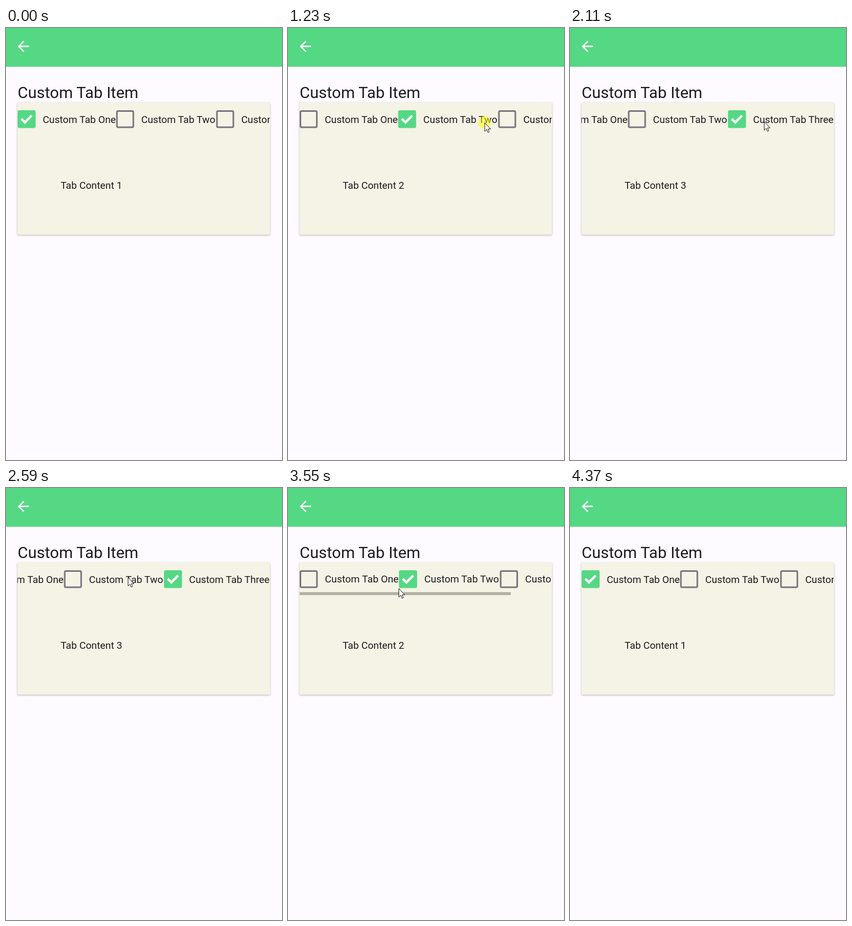
Animation of 522x814 px, one loop 4700 ms. Source, as an HTML page:

```html
<!DOCTYPE html>
<html lang="en">
<head>
<meta charset="utf-8">
<title>Custom Tab Item</title>
<style>
  html, body { margin: 0; width: 100%; height: 100%; overflow: hidden; background: #fdfbff; }
  svg { display: block; width: 522px; height: 814px; }
  text { font: 400 18.75px Roboto, sans-serif; fill: #1c1b1f; }
  .title { font-size: 30px; }
  .card { fill: #f5f3e5; filter: drop-shadow(0 1px 1.5px rgba(0, 0, 0, .3)); }
  .frame { fill: none; stroke: #79747e; stroke-width: 3; }
  .fill { fill: #55d884; }
  .tick { fill: none; stroke: #fff; stroke-width: 4.4; }
</style>
</head>
<body>
<svg viewBox="0 0 522 814">
  <defs>
    <clipPath id="view"><rect x="21.5" y="141" width="477.5" height="248"/></clipPath>
    <g id="off"><rect class="frame" x="1.5" y="1.5" width="31" height="30.5" rx="2"/></g>
    <g id="on">
      <rect class="fill" width="34" height="33.5" rx="3"/>
      <path class="tick" d="M7 16.2 13.8 22.8 26.6 10"/>
    </g>
  </defs>
  <rect width="522" height="814" fill="#fdfbff"/>
  <rect class="fill" width="522" height="73"/>
  <path transform="translate(16.8 18.7) scale(1.333)" fill="#fff"
    d="M20 11H7.83l5.59-5.59L12 4l-8 8 8 8 1.41-1.41L7.83 13H20z"/>
  <text class="title" x="22" y="132">Custom Tab Item</text>
  <rect class="card" x="21.5" y="140.5" width="478" height="249" rx="2"/>
  <g clip-path="url(#view)">
    <g id="strip"></g>
    <rect id="bar" y="196.3" width="396" height="5.4" fill="#b3aea3"/>
  </g>
  <text id="content" x="103.2" y="303"></text>
  <g id="pointer">
    <circle id="press" r="12" fill="#ff0" fill-opacity=".5"/>
    <path d="M.5 .5V16.6L4.2 13.2 6.6 18.8 9 17.8 6.7 12.3H11.5Z" fill="#fff" stroke="#111"/>
  </g>
</svg>
<script>
const LOOP = 4700, STEP = 68.3, LEFT = 22, VIEW = 477.5, TOTAL = 576.2;
const ENTER = 65, LEAVE = 4365, SETTLE = 3360;
const swipes = [1240, 3150];
const clicks = [{ time: 760, tab: 2 }, { time: 2050, tab: 3 }, { time: 2730, tab: 2 }, { time: 3960, tab: 1 }];

// Pointer stops: time, x, y
const stops = [
  [70, 448, 722], [550, 268, 180], [790, 270, 176], [1090, 396, 176], [1230, 371.5, 178],
  [1420, 302, 180], [1708, 387.5, 182], [2050, 386, 177], [2595, 230.5, 168],
  [3000, 124, 178], [3142, 143, 179], [3390, 238, 192], [3550, 209.5, 189],
  [3990, 118, 178], [4371, 505, 800]
];

const $ = id => document.getElementById(id);
const ramp = (t, from, length) => Math.min(1, Math.max(0, (t - from) / length));
const easeOut = p => 1 - (1 - p) ** 2;
const mix = (a, b, p) => a + (b - a) * p;

function pointerAt(t) {
  const i = Math.max(1, stops.findIndex(s => s[0] > t));
  const [t0, x0, y0] = stops[i - 1], [t1, x1, y1] = stops[i];
  const p = ramp(t, t0, t1 - t0);
  return [mix(x0, x1, p), mix(y0, y1, p)];
}

let left = 0;
$("strip").innerHTML = [["One", 186.3], ["Two", 189.2], ["Three", 200.7]].map(([name, width]) => {
  const tab = `<g transform="translate(${left} 155)"><use href="#off"/><text x="47.4" y="23.5">Custom Tab ${name}</text></g>`;
  left += width;
  return tab;
}).join("");
const boxes = [...document.querySelectorAll("#strip use")];

function draw(t) {
  const [out, back] = swipes.map(s => easeOut(ramp(t, s, 240)));
  const offset = (out - back) * (TOTAL - VIEW);
  const stretch = 1 + .0087 * Math.sin(Math.PI * ramp(t, SETTLE, 340));
  const place = x => `translate(${LEFT + x} 0) scale(${stretch} 1)`;
  $("strip").setAttribute("transform", place(-offset));
  $("bar").setAttribute("transform", place(offset * VIEW / TOTAL));

  const swipe = swipes.filter(s => t >= s).pop();
  $("bar").setAttribute("opacity", swipe ? 1 - ramp(t, swipe + 560, 240) : 0);

  const tab = clicks.filter(c => t >= c.time).pop()?.tab ?? 1;
  boxes.forEach((box, i) => box.setAttribute("href", i + 1 === tab ? "#on" : "#off"));
  $("content").textContent = `Tab Content ${tab}`;

  $("pointer").setAttribute("transform", `translate(${pointerAt(t)})`);
  $("pointer").setAttribute("visibility", t >= ENTER && t < LEAVE ? "visible" : "hidden");
  const pressed = clicks.some(c => Math.abs(t - c.time) < 50) || swipes.some(s => t > s - 85 && t < s + 170);
  $("press").setAttribute("opacity", pressed ? 1 : 0);
}

// The screen refreshes in even steps, so each pose is held briefly.
const start = performance.now();
function tick() {
  const t = (performance.now() - start) % LOOP;
  draw(Math.floor((t + 18) / STEP) * STEP);
  requestAnimationFrame(tick);
}
tick();
</script>
</body>
</html>
```
